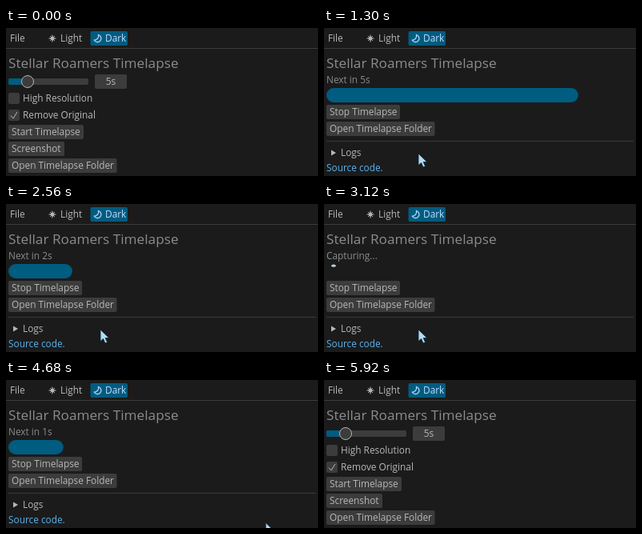
Recreate the animation shown at these times as an HTML page. Size 390 px wide and 185 px high, loop 8230 ms.

```html
<!DOCTYPE html>
<html lang="en">
<head>
<meta charset="utf-8">
<title>Timelapse panel</title>
<style>
  html, body { margin: 0; width: 100%; height: 100%; overflow: hidden; background: #1b1b1b; }
  svg { display: block; width: 390px; height: 185px; }
  text { font: 400 11.85px "Open Sans", "Noto Sans", sans-serif; fill: #b8b8b8; }
  .dim { fill: #8c8c8c; }
  .heading { font-size: 17.2px; fill: #8c8c8c; }
  .selected { fill: #c0deff; }
  .link { fill: #5ab4f0; }
  .box { fill: #3c3c3c; }
  .accent { fill: #005c80; }
  .line { stroke: #3c3c3c; }
  .hover rect { fill: #2b2b2b; stroke: #f0f0f0; stroke-width: 1.5; }
  .hover text { fill: #d4e8fc; }
</style>
</head>
<body>
<svg viewBox="0 0 390 185">
  <text x="5" y="17">File</text>
  <g stroke="#b8b8b8">
    <path d="M58 8.5v9M53.5 13h9M55 10l6 6M61 10l-6 6"/>
    <circle cx="58" cy="13" r="2" fill="#b8b8b8"/>
  </g>
  <text x="68" y="17">Light</text>
  <rect class="accent" x="105.5" y="4" width="46.5" height="18" rx="2"/>
  <path d="M115.5 8.5A4.6 4.6 0 1 1 110.3 15.2A5.5 5.5 0 0 0 115.5 8.5Z" fill="none" stroke="#c0deff" stroke-width="1.2"/>
  <text class="selected" x="124" y="17">Dark</text>
  <path class="line" d="M0 25.5H390"/>
  <text class="heading" x="3" y="50">Stellar Roamers Timelapse</text>

  <g id="settings">
    <rect class="box" x="3" y="63" width="100" height="8" rx="2"/>
    <rect class="accent" x="3" y="63" width="24" height="8" rx="2"/>
    <circle class="box" cx="27" cy="67" r="7.5" stroke="#b4b4b4"/>
    <rect class="box" x="111" y="58" width="40" height="18" rx="2"/>
    <text x="131" y="71" text-anchor="middle">5s</text>
    <rect class="box" x="3" y="81" width="14" height="14" rx="2"/>
    <text x="21" y="92">High Resolution</text>
    <rect class="box" x="3" y="102" width="14" height="14" rx="2"/>
    <path d="M6 109.5l3 3.5l5-8" fill="none" stroke="#b8b8b8"/>
    <text x="21" y="113">Remove Original</text>
  </g>

  <g id="running">
    <text id="status" class="dim" x="3" y="69"></text>
    <rect id="bar" class="accent" x="3" y="75" height="18" rx="9"/>
    <path id="stub" d="M9 78Q9 75.5 12 75.5T15 78Q12 79.5 9 78Z" fill="#b5d0e0"/>
    <path class="line" d="M3 141.5H387"/>
    <path d="M9 152.5L15 156L9 159.5Z" fill="#b8b8b8"/>
    <text x="21" y="160">Logs</text>
    <text class="link" x="3" y="179">Source code.</text>
  </g>

  <circle id="press" r="11.5" fill="#b4b4b4" opacity=".65"/>
  <path id="cursor" d="M0 0V14.5L3.5 11.5L6 17L8.6 15.8L6.2 10.5H10.8Z"
        fill="#b0dcf5" stroke="#10202c" stroke-width=".8"/>
</svg>
<script>
const LOOP = 8230;
const START = 930, STOP = 5570;
const CYCLE = 2060, CAPTURE = 200, PRESS = 100;
const SECONDS = 5, FULL_WIDTH = 384;
const ENTER = 60, LEAVE = 5920;

const linear = k => k;
const easeOut = k => 1 - (1 - k) ** 2;
const smooth = k => k * k * (3 - 2 * k);

const startButton = [57, 133], stopButton = [50, 106], rest = [118, 157], wait = [145, 112];
const moves = [
  { at: ENTER, ms: 300, from: [262, 174], to: startButton, ease: easeOut },
  { at: 960, ms: 290, from: startButton, to: rest, ease: smooth },
  { at: 4130, ms: 170, from: rest, to: [300, 190], ease: linear },
  { at: 4680, ms: 290, from: [326, 179], to: wait, ease: easeOut },
  { at: 5230, ms: 190, from: wait, to: stopButton, ease: smooth },
  { at: 5620, ms: 300, from: stopButton, to: [356, 162], ease: linear }
];

const $ = id => document.getElementById(id);
const svg = document.querySelector('svg');
const show = (node, on) => { node.style.display = on ? '' : 'none'; };

function pointer(t) {
  if (t < ENTER || t >= LEAVE) return [-50, -50];
  const { at, ms, from, to, ease } = moves.findLast(m => t >= m.at);
  const k = ease(Math.min(1, (t - at) / ms));
  return from.map((v, i) => v + (to[i] - v) * k);
}

function button(parent, label, y, width) {
  const g = document.createElementNS(svg.namespaceURI, 'g');
  g.innerHTML = `<rect class="box" x="3" y="${y}" width="${width}" height="18" rx="2"/>
    <text x="7" y="${y + 13}">${label}</text>`;
  parent.append(g);
  return { g, y, width };
}

const settings = $('settings'), running = $('running');
const buttons = [
  button(settings, 'Start Timelapse', 121, 94),
  button(settings, 'Screenshot', 142, 70),
  button(settings, 'Open Timelapse Folder', 163, 135.5),
  button(running, 'Stop Timelapse', 96, 92),
  button(running, 'Open Timelapse Folder', 117, 135.5)
];

function drawCountdown(elapsed) {
  const capturing = elapsed < CAPTURE;
  const left = 1 - elapsed / CYCLE;
  $('status').textContent = capturing ? 'Capturing...' : `Next in ${Math.ceil(left * SECONDS)}s`;
  $('bar').setAttribute('width', Math.max(18, left * FULL_WIDTH));
  show($('bar'), !capturing);
  show($('stub'), capturing);
}

function draw(t) {
  const active = t >= START && t < STOP;
  show(settings, !active);
  show(running, active);
  if (active) drawCountdown((t - START) % CYCLE);

  const [x, y] = pointer(t);
  $('cursor').setAttribute('transform', `translate(${x} ${y})`);
  $('press').setAttribute('transform', `translate(${x} ${y - 1})`);
  show($('press'), [START, STOP].some(end => t >= end - PRESS && t < end));

  for (const b of buttons) {
    const over = x >= 3 && x < 3 + b.width && y >= b.y && y < b.y + 18;
    b.g.setAttribute('class', over ? 'hover' : '');
    const grow = over ? 0.5 : 0;
    const rect = b.g.firstElementChild;
    rect.setAttribute('x', 3 - grow);
    rect.setAttribute('y', b.y - grow);
    rect.setAttribute('width', b.width + 2 * grow);
    rect.setAttribute('height', 18 + 2 * grow);
  }
}

const begin = performance.now();
function tick() {
  draw((performance.now() - begin) % LOOP);
  requestAnimationFrame(tick);
}
tick();
</script>
</body>
</html>
```
